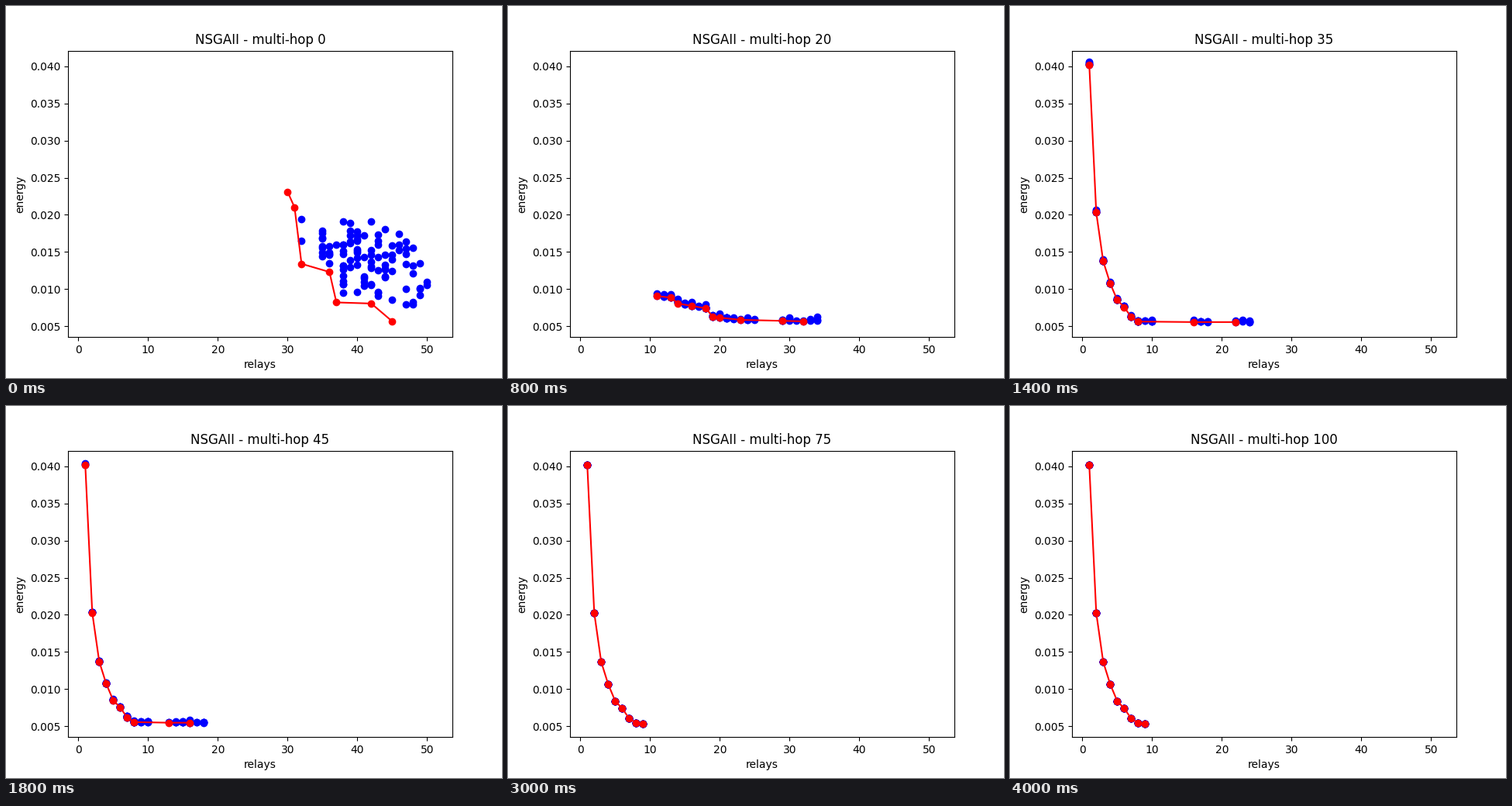
These frames come from a looping animation (640 by 480 pixels, 4.2 s). A matplotlib script:

```python
import numpy as np
import matplotlib.pyplot as plt
from matplotlib.animation import FuncAnimation

STEP = 5          # generations between two frames
FRAMES = 21
POPULATION = 100
REACHED = 35      # generation at which a single relay first suffices
SETTLED = 65      # generation at which the front stops shrinking

# Corners of the advancing front (energies in thousandths).
KEY_GENERATIONS = [0, 10, 20, 30]
KEY_RELAYS = np.array([[30, 31, 32, 36, 37, 42, 45],
                       [20, 21, 24, 25, 27, 37, 39],
                       [11, 13, 14, 18, 19, 23, 32],
                       [3, 4, 5, 10, 11, 15, 26]])
KEY_ENERGY = np.array([[23.1, 21, 13.4, 12.3, 8.2, 8.05, 5.65],
                       [12.3, 9.05, 8.25, 7.4, 6.4, 6.05, 5.6],
                       [9.05, 8.85, 8.05, 7.4, 6.25, 5.85, 5.65],
                       [14.3, 11.8, 8.85, 7.4, 6.25, 5.75, 5.55]])
# Best energy for 1, 2, 3, ... relays.
LIMIT = np.array([40.2, 20.25, 13.65, 10.65, 8.4, 7.4, 6.05, 5.4, 5.3])


def between_keys(rows, generation):
    return np.array([np.interp(generation, KEY_GENERATIONS, column)
                     for column in rows.T])


def advancing_front(generation, rng):
    corners = np.round(between_keys(KEY_RELAYS, generation))
    energy = between_keys(KEY_ENERGY, generation)
    extra = rng.integers(corners[0], corners[-1], 4 if generation else 0)
    relays = np.union1d(corners, extra)
    return relays, np.interp(relays, corners, energy)


def converging_front(generation):
    left = max(0, (SETTLED - generation) / (SETTLED - REACHED))
    count = len(LIMIT)
    last = round(count + 13 * left ** 1.5)
    relays = np.unique([*range(1, count), (count + last + 1) // 2, last])
    energy = np.interp(relays, np.arange(1, count + 1), LIMIT)
    return relays, energy + 0.25 * left * np.minimum(relays / count, 1)


def first_crowd(front, rng):
    relays = np.clip(np.round(rng.normal(41, 4.5, POPULATION)), 32, 51)
    energy = 14 - 0.3 * (relays - 41) + rng.normal(0, 3, POPULATION)
    floor = np.interp(relays, *front) + rng.uniform(0.3, 3, POPULATION)
    return relays, np.clip(energy, floor, 25)


def later_crowd(generation, front, rng):
    moving = generation < SETTLED
    left = max(0, 1 - generation / SETTLED)
    relays = rng.choice(front[0], POPULATION)
    relays = relays + rng.integers(0, 3 if moving else 1, POPULATION)
    scatter = moving * (12 * np.exp(-generation / 2.5) + 0.2 * left)
    noise = rng.exponential(1, POPULATION) * scatter
    return relays, np.interp(relays, *front) + noise


def evolve(generation):
    rng = np.random.default_rng(generation)
    if generation < REACHED:
        front = advancing_front(generation, rng)
    else:
        front = converging_front(generation)
    if generation == 0:
        return front, first_crowd(front, rng)
    return front, later_crowd(generation, front, rng)


fig, ax = plt.subplots(figsize=(6.4, 4.8), dpi=100)
ax.set(xlim=(-1.475, 53.625), ylim=(0.00353, 0.04211),
       xlabel="relays", ylabel="energy")
title = ax.set_title("")
crowd_dots, = ax.plot([], [], "bo")
front_line, = ax.plot([], [], "ro-")


def draw(frame):
    generation = frame * STEP
    title.set_text(f"NSGAII - multi-hop {generation}")
    for artist, (relays, energy) in zip((front_line, crowd_dots),
                                        evolve(generation)):
        artist.set_data(relays, energy / 1000)
    return title, crowd_dots, front_line


anim = FuncAnimation(fig, draw, frames=FRAMES, interval=200,
                     repeat=True, repeat_delay=0)
plt.show()
```
